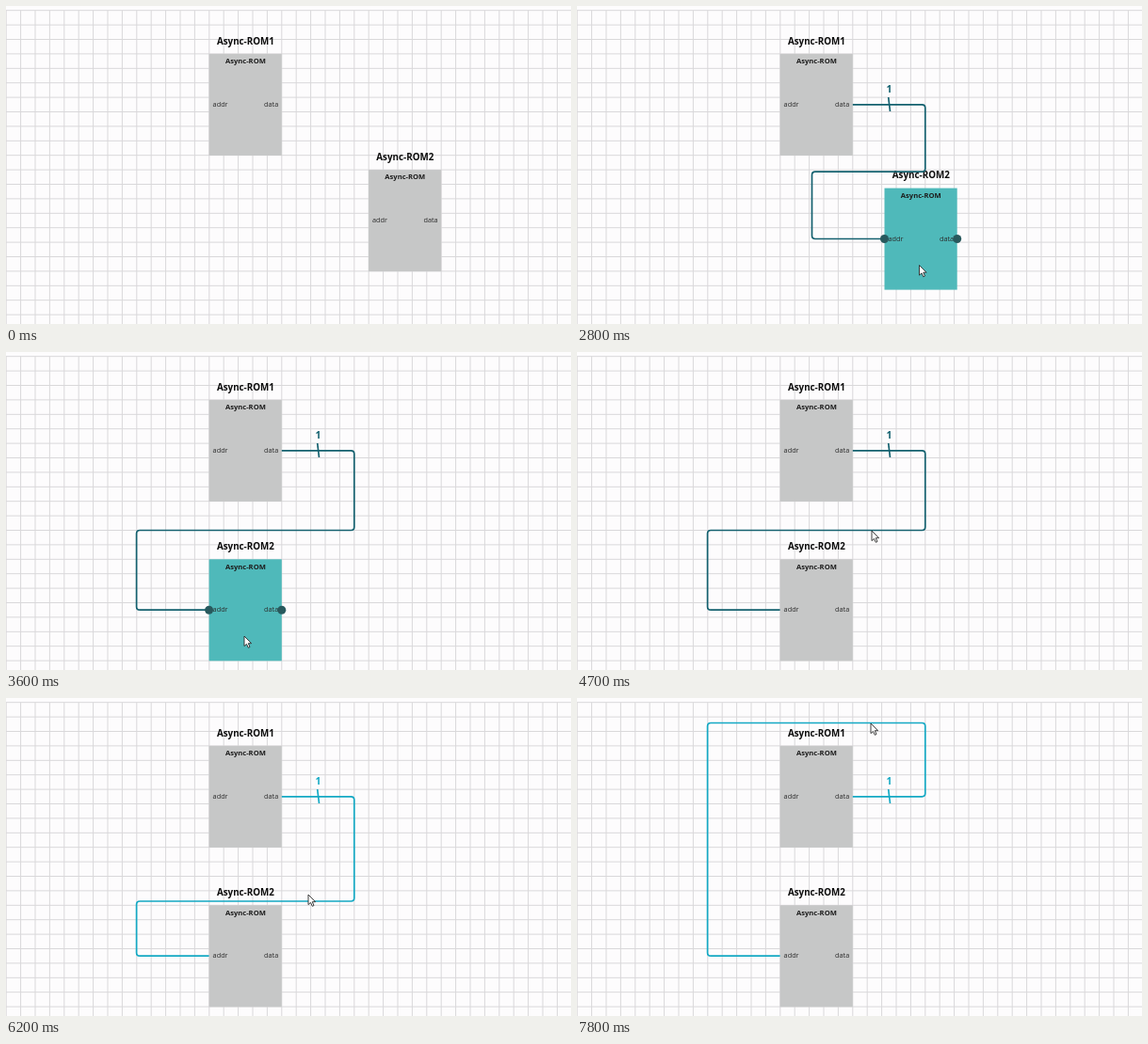
Animation, 600 px wide and 338 px high, one loop 8 s. Source, as an HTML page:

```html
<!DOCTYPE html>
<html lang="en">
<head>
<meta charset="utf-8">
<title>Connecting two ROM blocks</title>
<style>
  html, body { margin: 0; width: 100%; height: 100%; overflow: hidden; background: #fdfcfd; }
  svg { display: block; width: 600px; height: 338px; }
  text { font-family: "Open Sans", "Noto Sans", sans-serif; fill: #2b2b2b; }
  .grid { stroke: #d9d8da; stroke-width: 1; fill: none; }
  .body { fill: #c6c7c7; }
  .hot .body { fill: #4fb9ba; }
  .title { font-size: 9.8px; font-weight: 700; text-anchor: middle; fill: #0c0c0c; }
  .type { font-size: 7.6px; font-weight: 700; text-anchor: middle; fill: #1d1d1d; }
  .port { font-size: 7.3px; }
  .end { text-anchor: end; }
  .dot { fill: #28595d; }
  #wire { color: #14616f; }
  #wire.hot { color: #14a9c4; }
  #wire path { fill: none; stroke: currentColor; stroke-width: 1.7; }
  #wire text { fill: currentColor; font-size: 10.5px; font-weight: 700; text-anchor: middle; }
  #link { stroke: #3b7482; stroke-width: 1; stroke-dasharray: 7 5.5; }
</style>
</head>
<body>
<svg viewBox="0 0 600 338">
  <defs>
    <g id="rom">
      <rect class="body" width="77.2" height="108"/>
      <text class="type" x="38.8" y="10.3">Async-ROM</text>
      <text class="port" x="4" y="56">addr</text>
      <text class="port end" x="73.6" y="56">data</text>
    </g>
  </defs>
  <path class="grid" id="grid"/>
  <g id="rom1">
    <use href="#rom"/>
    <text class="title" x="38.8" y="-10.2">Async-ROM1</text>
  </g>
  <g id="rom2">
    <rect class="body" width="77.2" height="108"/>
    <text class="type" x="38.8" y="10.3">Async-ROM</text>
    <text class="port" x="4" y="56">addr</text>
    <text class="port end" x="73.6" y="56">data</text>
    <text class="title" x="38.8" y="-10.2">Async-ROM2</text>
  </g>
  <line id="link"/>
  <g id="wire">
    <path id="route"/>
    <path d="M330.7 97L332.5 112"/>
    <text x="331.5" y="92.3">1</text>
  </g>
  <circle class="dot" id="in1"/>
  <circle class="dot" id="out1"/>
  <circle class="dot" id="in2"/>
  <circle class="dot" id="out2"/>
  <path id="cursor" d="M0 0V10.6L2.5 8.4L4.3 12.3L6 11.5L4.3 7.7H7.6Z" fill="#fff" stroke="#2a2a2a" stroke-width=".9" stroke-linejoin="round"/>
</svg>
<script>
const $ = id => document.getElementById(id);
const CELL = 15.4, TOP = 4.7, LOOP = 8000, STUB = 77;
const A = { x: 14 * CELL, y: TOP + 3 * CELL };
const B = { x: 25 * CELL, y: TOP + 11 * CELL };
const W = 77.2, MID = 53.9;

// Each key: time, then the values reached at that time.
const pointer = [
  [400, 203, 122], [1000, 292, 104], [1200, 296, 108], [1700, 382, 229],
  [2200, 382, 229], [2500, 422, 256], [3100, 305, 295], [3500, 253, 302],
  [3700, 253, 302], [4000, 262, 279], [4600, 313, 190], [4700, 313, 190],
  [4800, 313, 199], [4900, 316, 226], [5300, 320, 331], [5900, 320, 331],
  [6200, 321, 209], [6500, 320, 186], [7100, 320, 186], [7700, 312, 27]
];
const shift = [[2500, 0, 0], [3100, -117, 39], [3500, -169.4, 46.2]];
const bend = [
  [4700, 189.5], [4800, 200], [4900, 226], [5300, 331], [5900, 331],
  [6200, 216], [6500, 185.3], [7100, 185.3], [7700, 26.5]
];

function at(keys, t) {
  const i = keys.findIndex(k => k[0] > t);
  if (i === 0) return keys[0].slice(1);
  if (i < 0) return keys[keys.length - 1].slice(1);
  const a = keys[i - 1], b = keys[i], p = (t - a[0]) / (b[0] - a[0]);
  return a.slice(1).map((v, j) => v + (b[j + 1] - v) * p);
}

function rounded(pts, r) {
  const toward = (p, q) => {
    const len = Math.hypot(q[0] - p[0], q[1] - p[1]) || 1;
    const k = Math.min(r, len / 2) / len;
    return [p[0] + (q[0] - p[0]) * k, p[1] + (q[1] - p[1]) * k];
  };
  let d = "M" + pts[0];
  for (let i = 1; i < pts.length - 1; i++)
    d += "L" + toward(pts[i], pts[i - 1]) + "Q" + pts[i] + " " + toward(pts[i], pts[i + 1]);
  return d + "L" + pts[pts.length - 1];
}

function set(id, attrs) {
  for (const k in attrs) $(id).setAttribute(k, attrs[k]);
}
const show = (id, on) => { $(id).style.display = on ? "" : "none"; };
const move = (id, x, y) => set(id, { transform: `translate(${x} ${y})` });

function draw(ms) {
  const t = Math.floor(ms % LOOP / 100) * 100;
  const within = (a, b) => t >= a && t < b;
  const [px, py] = at(pointer, t);
  const [dx, dy] = at(shift, t);
  const bx = B.x + dx, by = B.y + dy;
  const y1 = A.y + MID, y2 = by + MID;
  const linking = within(1300, 2300), hot = within(2400, 3900);

  move("cursor", px, py);
  show("cursor", t >= 400);
  move("rom2", bx, by);
  $("rom2").classList.toggle("hot", hot);

  set("link", { x1: 296, y1: 108.5, x2: px, y2: py });
  show("link", linking);

  const x1 = A.x + W, right = x1 + STUB, left = bx - STUB;
  const y = t < 4700 ? (y1 + y2) / 2 : at(bend, t)[0];
  set("route", { d: rounded([[x1, y1], [right, y1], [right, y], [left, y], [left, y2], [bx, y2]], 3.5) });
  show("wire", t >= 2300);
  $("wire").classList.toggle("hot", within(4800, 5500) || t >= 5900);

  const over = within(700, 1300), r = hot ? 4.5 : 5.8;
  set("in1", { cx: A.x, cy: y1, r });
  set("out1", { cx: x1, cy: y1, r });
  set("in2", { cx: bx, cy: y2, r });
  set("out2", { cx: bx + W, cy: y2, r });
  show("in1", over || linking);
  show("out1", over);
  show("in2", linking || hot);
  show("out2", hot);
}

let lines = "";
for (let x = 0.2; x < 600; x += CELL) lines += `M${x} ${TOP}V338`;
for (let y = TOP; y < 338; y += CELL) lines += `M0 ${y}H600`;
set("grid", { d: lines });
move("rom1", A.x, A.y);

const start = performance.now();
function tick() {
  draw(performance.now() - start);
  requestAnimationFrame(tick);
}
tick();
</script>
</body>
</html>
```
